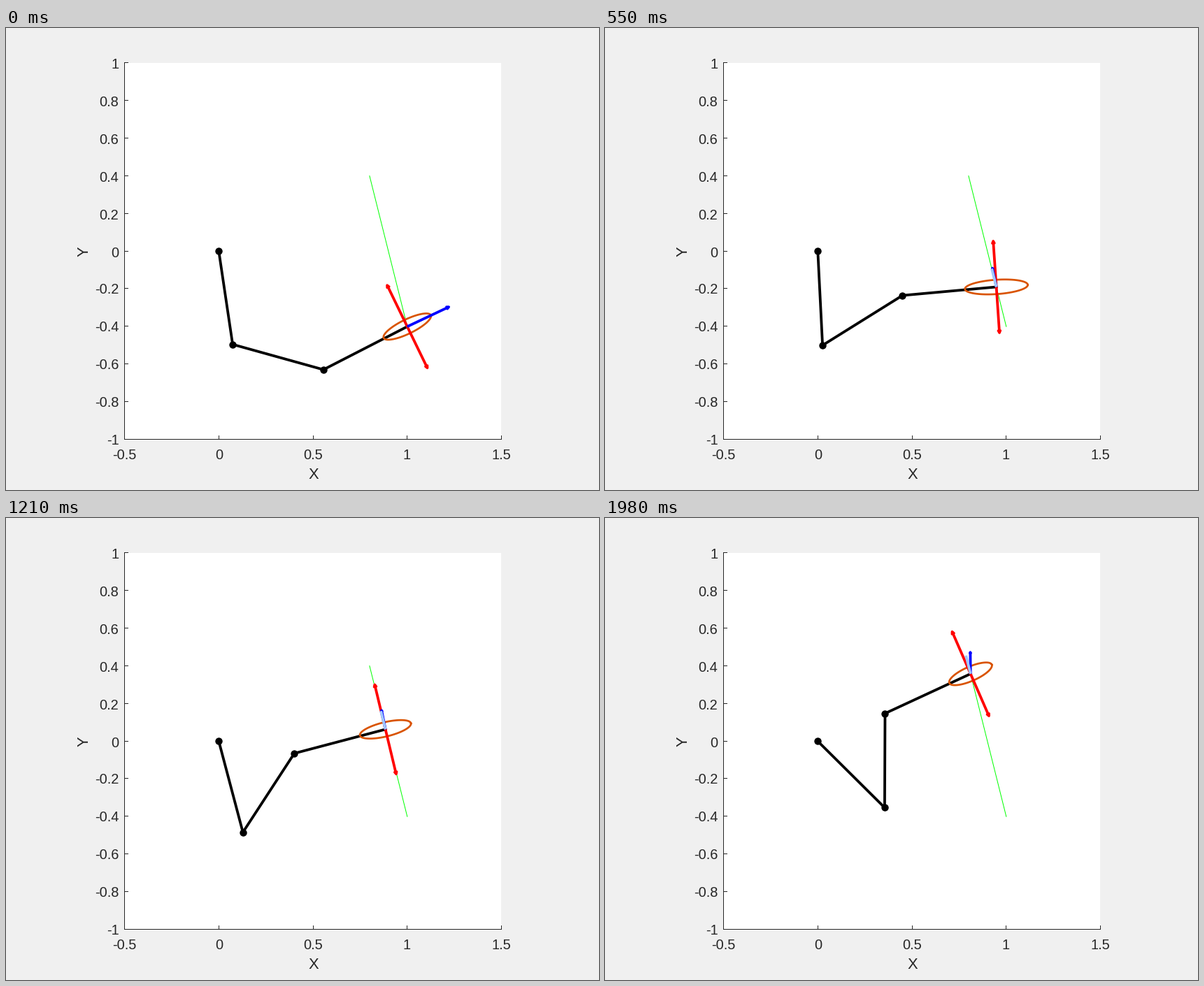
A matplotlib script that plays this animation: 848x661 px, repeating every 2090 ms.

```python
import numpy as np
import matplotlib.pyplot as plt
from matplotlib.animation import FuncAnimation

W, H, N = 848, 661, 19
SCALE, X0, Y0 = 269.5, 304.3, 319.4
LINK = 0.5
INK = "#262626"

plt.rcParams["font.family"] = "Liberation Sans"
fig = plt.figure(figsize=(W / 72, H / 72), dpi=72, facecolor="#f0f0f0")
ax = fig.add_axes([0, 0, 1, 1])
ax.set(xlim=(0, W), ylim=(H, 0))
ax.axis("off")


def px(p):
    """Plot units to stage pixels."""
    p = np.asarray(p, float)
    return np.stack([X0 + SCALE * p[..., 0], Y0 - SCALE * p[..., 1]], -1)


def unit(a):
    return np.array([np.cos(a), np.sin(a)])


def line(color, width, z, x=(), y=(), **kw):
    return ax.plot(x, y, color=color, lw=width, zorder=z, snap=False, **kw)[0]


def put(artist, pts):
    artist.set_data(*px(pts).T)


def label(x, y, s, size=20, ha="center", **kw):
    ax.text(x, y, s, size=size, color=INK, ha=ha, **kw)


# Axes box, ticks and labels
LEFT, RIGHT, TOP, BOTTOM = 169.5, 708.5, 49.5, 588.5
ax.add_patch(plt.Rectangle((LEFT, TOP + 0.5), RIGHT - LEFT - 0.5, BOTTOM - TOP,
                           fc="white", lw=0, zorder=0, snap=False))
line(INK, 1, 1, [LEFT, LEFT, RIGHT], [TOP, BOTTOM, BOTTOM],
     solid_capstyle="projecting")
for v in np.linspace(-0.5, 1.5, 5):
    x = np.floor(LEFT + SCALE * (v + 0.5)) + 0.5
    line(INK, 1, 1, [x, x], [BOTTOM - 5, BOTTOM])
    label(x, 617, f"{v:g}")
for v in np.linspace(-1, 1, 11):
    y = np.floor(BOTTOM - SCALE * (v + 1)) + 0.5
    line(INK, 1, 1, [LEFT, LEFT + 5], [y, y])
    label(161.5, y + 8, f"{round(v, 1) + 0:g}", ha="right")
label(439.5, 645, "X", 22)
label(112, 319.5, "Y", 22, va="center", rotation=90)

# Straight path of the tip
START, STEP = np.array([1.0, -0.4]), np.array([-0.2, 0.8])
GOAL = 0.1 * STEP / np.hypot(*STEP)
put(line("#00ff00", 1, 2), [START, START + STEP])

arm = line("black", 3.8, 3, solid_joinstyle="round")
joints = line("black", 0, 4, marker="o", ms=10.4, mew=0)
ring = line("#d95300", 2.7, 5)


def make_arrow(color, z):
    return [line(color, 3.8, z, solid_capstyle="butt"),
            line(color, 3.2, z, solid_joinstyle="round", solid_capstyle="round")]


red_up, red_down = make_arrow("red", 6), make_arrow("red", 6)
blue = make_arrow("blue", 7)
goal = line("#a0c8ff", 3.8, 8, solid_capstyle="butt")


def set_arrow(arrow, tail, vec):
    """Shaft with a head in proportion to its length."""
    tip = tail + vec
    side = np.array([-vec[1], vec[0]]) * 0.025
    back = tip - vec * 0.07
    put(arrow[0], [tail, tip - vec * 0.02])
    put(arrow[1], [back + side, tip - vec * 0.02, back - side])


def hand_angle(i):
    """Slow cubic rise plus a swing that settles in the first steps."""
    swing = (15.4 - 13.7 * i) * np.exp(-(i / 3.5) ** 2)
    return np.radians(11.8 + 0.00224 * i ** 3 + swing)


def velocity(i):
    """A sideways kick at the start, then the goal with a late drift."""
    if i == 0:
        return 0.25 * unit(np.radians(25.3))
    return GOAL + [0.003, 0.006] + np.array([0.02, 0.015]) * (i / (N - 1)) ** 8


TURN = np.linspace(0, 2 * np.pi, 121)


def draw(i):
    tip = START + STEP * i / N
    phi = hand_angle(i)
    wrist = tip - LINK * unit(phi)
    reach = np.hypot(*wrist)
    shoulder = np.arctan2(wrist[1], wrist[0]) - np.arccos(reach / (2 * LINK))
    elbow = LINK * unit(shoulder)
    put(arm, [(0, 0), elbow, wrist, tip])
    put(joints, [(0, 0), elbow, wrist])

    # Inertia ellipse lies along the last link; the easy direction crosses it
    tilt = phi - np.radians(1.3)
    along, across = unit(tilt), unit(tilt + np.pi / 2)
    major = 0.1225 + 0.045 * np.exp(-((i - 5.5) / 5.5) ** 2)
    put(ring, tip + major * np.outer(np.cos(TURN), along)
        + 0.038 * np.outer(np.sin(TURN), across))
    set_arrow(red_up, tip, 0.25 * across)
    set_arrow(red_down, tip, -0.25 * across)

    set_arrow(blue, tip, velocity(i))
    put(goal, [tip, tip + GOAL])
    goal.set_visible(i > 0)
    return [arm, joints, ring, *red_up, *red_down, *blue, goal]


anim = FuncAnimation(fig, draw, frames=N, interval=110, repeat=True,
                     repeat_delay=0, blit=False)
plt.show()
```
